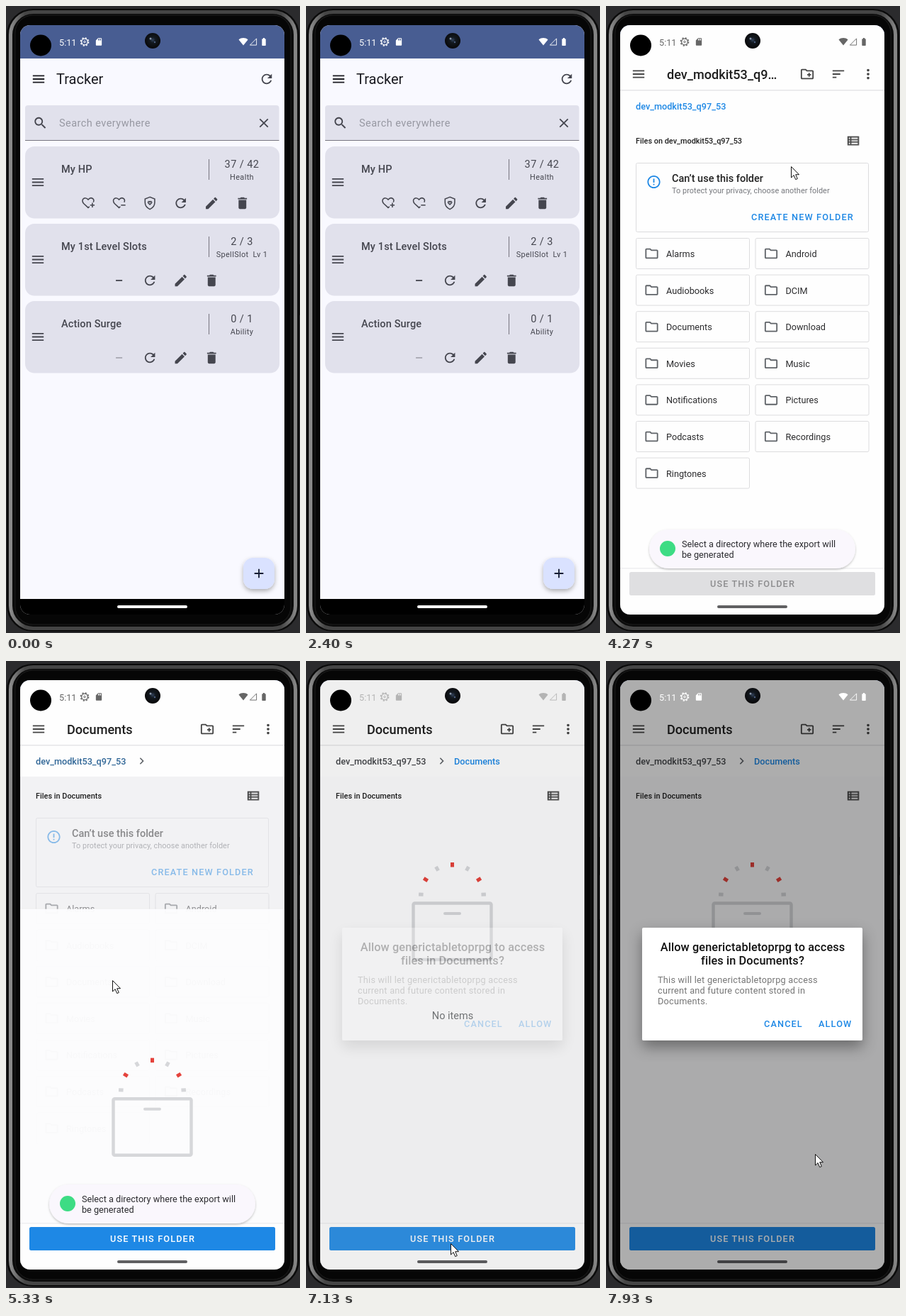
Animation of 415 by 884 pixels, one loop 8 s. Source, as an HTML page:

```html
<!DOCTYPE html>
<html lang="en">
<head>
<meta charset="utf-8">
<title>Tracker export</title>
<style>
  html, body { margin: 0; width: 100%; height: 100%; overflow: hidden; background: #2b2b2d; }
  svg { display: block; width: 415px; height: 884px; font-family: Roboto, sans-serif; }
  text { white-space: pre; }
</style>
</head>
<body>
<svg id="stage" viewBox="0 0 415 884"></svg>
<script>
const LOOP = 8000;
const DEVICE = 'dev_modkit53_q97_53';
const BLUE = '#1e88e5';
const INK = '#45464f';

const ICONS = {
  menu: 'M3 18h18v-2H3v2zm0-5h18v-2H3v2zm0-7v2h18V6H3z',
  refresh: 'M17.65 6.35C16.2 4.9 14.21 4 12 4c-4.42 0-7.99 3.58-7.99 8s3.57 8 7.99 8c3.73 0 6.84-2.55 7.73-6h-2.08c-.82 2.33-3.04 4-5.65 4-3.31 0-6-2.69-6-6s2.69-6 6-6c1.66 0 3.14.69 4.22 1.78L13 11h7V4l-2.35 2.35z',
  search: 'M15.5 14h-.79l-.28-.27C15.41 12.59 16 11.11 16 9.5 16 5.91 13.09 3 9.5 3S3 5.91 3 9.5 5.91 16 9.5 16c1.61 0 3.09-.59 4.23-1.57l.27.28v.79l5 4.99L20.49 19l-4.99-5zm-6 0C7.01 14 5 11.99 5 9.5S7.01 5 9.5 5 14 7.01 14 9.5 11.99 14 9.5 14z',
  close: 'M19 6.41L17.59 5 12 10.59 6.41 5 5 6.41 10.59 12 5 17.59 6.41 19 12 13.41 17.59 19 19 17.59 13.41 12z',
  edit: 'M3 17.25V21h3.75L17.81 9.94l-3.75-3.75L3 17.25zM20.71 7.04c.39-.39.39-1.02 0-1.41l-2.34-2.34c-.39-.39-1.02-.39-1.41 0l-1.83 1.83 3.75 3.75 1.83-1.83z',
  trash: 'M6 19c0 1.1.9 2 2 2h8c1.1 0 2-.9 2-2V7H6v12zM19 4h-3.5l-1-1h-5l-1 1H5v2h14V4z',
  minus: 'M7 11h10v2H7z',
  add: 'M19 13h-6v6h-2v-6H5v-2h6V5h2v6h6v2z',
  send: 'M17 17h2v4c0 1.1-.9 2-2 2H7c-1.1 0-2-.9-2-2V3c0-1.1.9-2 2-2h10c1.1 0 2 .9 2 2v4h-2V6H7v12h10v-1zm5-5l-4-4v3h-5v2h5v3l4-4z',
  folder: 'M9.17 6l2 2H20v10H4V6h5.17M10 4H4c-1.1 0-1.99.9-1.99 2L2 18c0 1.1.9 2 2 2h16c1.1 0 2-.9 2-2V8c0-1.1-.9-2-2-2h-8l-2-2z',
  newFolder: 'M20 6h-8l-2-2H4c-1.11 0-1.99.89-1.99 2L2 18c0 1.11.89 2 2 2h16c1.11 0 2-.89 2-2V8c0-1.11-.89-2-2-2zm0 12H4V6h5.17l2 2H20v10zm-8-4h2v2h2v-2h2v-2h-2v-2h-2v2h-2z',
  sort: 'M3 18h6v-2H3v2zM3 6v2h18V6H3zm0 7h12v-2H3v2z',
  more: 'M12 8c1.1 0 2-.9 2-2s-.9-2-2-2-2 .9-2 2 .9 2 2 2zm0 2c-1.1 0-2 .9-2 2s.9 2 2 2 2-.9 2-2-.9-2-2-2zm0 6c-1.1 0-2 .9-2 2s.9 2 2 2 2-.9 2-2-.9-2-2-2z',
  list: 'M3 5v14h18V5H3zm4 2v2H5V7h2zm-2 6v-2h2v2H5zm0 2h2v2H5v-2zm14 2H9v-2h10v2zm0-4H9v-2h10v2zm0-4H9V7h10v2z',
  alert: 'M11 15h2v2h-2zm0-8h2v6h-2zm.99-5C6.47 2 2 6.48 2 12s4.47 10 9.99 10C17.52 22 22 17.52 22 12S17.52 2 11.99 2zM12 20c-4.42 0-8-3.58-8-8s3.58-8 8-8 8 3.58 8 8-3.58 8-8 8z',
  chevron: 'M10 6L8.59 7.41 13.17 12l-4.58 4.59L10 18l6-6z',
  wifi: 'M12 21L0 6.4C3.4 3.6 7.5 2 12 2s8.6 1.6 12 4.4z',
  battery: 'M15.67 4H14V2h-4v2H8.33C7.6 4 7 4.6 7 5.33v15.33C7 21.4 7.6 22 8.33 22h7.33c.74 0 1.34-.6 1.34-1.33V5.33C17 4.6 16.4 4 15.67 4z',
  card: 'M18 2h-8L4.02 8 4 20c0 1.1.9 2 2 2h12c1.1 0 2-.9 2-2V4c0-1.1-.9-2-2-2zm-6 6h-2V4h2v4zm3 0h-2V4h2v4zm3 0h-2V4h2v4z'
};
const HEART = 'M14 17.2L12 19 5 12.5C-.5 6 7.5 1 12 6.5 16.5 1 22.5 5.5 20 10.5';
const LINES = {
  heal: HEART + 'M15 15h7M18.5 11.5v7',
  hurt: HEART + 'M15 15h7',
  shield: 'M12 2.5L4.5 5.5v5.5c0 5 3.2 8.6 7.5 10.5 4.3-1.9 7.5-5.5 7.5-10.5V5.5zM12 14.2l-2.6-2.6c-1-2.2 1.6-3.2 2.6-1.4 1-1.8 3.6-.8 2.6 1.4z',
  signal: 'M3.5 20.5h17v-17z'
};

const rect = (x, y, w, h, fill, extra = '') =>
  `<rect x="${x}" y="${y}" width="${w}" height="${h}" fill="${fill}" ${extra}/>`;
const group = (id, body, extra = '') => `<g id="${id}" ${extra}>${body}</g>`;
const icon = (name, cx, cy, color = INK, size = 21.8) => {
  const paint = LINES[name]
    ? `d="${LINES[name]}" fill="none" stroke="${color}" stroke-width="1.7"`
    : `d="${ICONS[name]}" fill="${color}"`;
  return `<path ${paint} transform="translate(${cx - size / 2} ${cy - size / 2}) scale(${size / 24})"/>`;
};
const text = (x, y, str, size, color, { w = 400, ls = 0, mid = false, id = '' } = {}) =>
  `<text ${id && `id="${id}"`} x="${x}" y="${y}" font-size="${size}" font-weight="${w}" fill="${color}" ` +
  `letter-spacing="${ls}" ${mid ? 'text-anchor="middle"' : ''}>${str}</text>`;
const caps = (x, y, str, color, id) => text(x, y, str, 12.7, color, { w: 500, ls: 1.13, id });
const pill = color => rect(157, 845, 99, 4, color, 'rx="2"');

function device() {
  return rect(0, 0, 415, 884, '#2b2b2d') +
    rect(411, 248, 4, 54, '#151515', 'rx="1"') + rect(411, 364, 4, 72, '#151515', 'rx="1"') +
    rect(2, 5, 411, 876, '#191919', 'rx="36" stroke="#0a0a0a" stroke-width="2"') +
    rect(6.5, 8.5, 402, 869, '#0b0b0b', 'rx="32" stroke="url(#metal)" stroke-width="5"') +
    rect(13, 13, 389, 859, '#060606', 'rx="25" stroke="#1d1d1d"');
}

function card(y, title, value, kind, tools, fade) {
  const first = tools.length > 4 ? 116 : 159.6;
  return rect(27, y, 359, 101.5, '#e1e1ec', 'rx="13"') +
    icon('menu', 45, y + 50.5) +
    text(78, y + 37, title, 14.5, INK, { w: 500, ls: .14 }) +
    rect(286, y + 18, 1, 29, '#777680') +
    text(333, y + 30, value, 14.5, INK, { ls: .45, mid: true }) +
    text(333, y + 47, kind, 10.9, INK, { ls: .36, mid: true }) +
    tools.map((name, i) => icon(name, first + i * 43.55, y + 80, fade && !i ? '#a9a9b3' : INK)).join('');
}

function tracker(id, hint, action, body) {
  return group(id,
    rect(20, 27, 373, 831, '#f9f9ff') + rect(20, 27, 373, 47, '#485d92') +
    icon('menu', 46, 103, '#1b1b21') + text(71, 110, 'Tracker', 20, '#1b1b21') + icon(action, 368, 103) +
    '<path d="M27 190v-46q0-4 4-4h350.500q4 0 4 4v46z" fill="#e1e1ec"/>' + rect(27, 189, 358.5, 1, '#777680') +
    icon('search', 48.5, 165) + text(75, 170, hint, 14.5, '#9798a2', { ls: .45 }) + icon('close', 364, 165) +
    body +
    rect(335, 778, 44, 44, '#dae2ff', 'rx="14" filter="url(#lift)"') + icon('add', 357, 800, '#131b33') +
    rect(20, 836, 373, 22, '#000') + pill('#fff'));
}

function folders() {
  const names = ['Alarms', 'Android', 'Audiobooks', 'DCIM', 'Documents', 'Download', 'Movies', 'Music',
    'Notifications', 'Pictures', 'Podcasts', 'Recordings', 'Ringtones'];
  const edge = 'stroke="#dcdcde" rx="2"';
  return rect(42.5, 221.5, 328, 97, 'none', edge) + icon('alert', 67.5, 248, BLUE) +
    text(93, 248, 'Can’t use this folder', 14.5, '#222', { w: 500 }) +
    text(93, 263.5, 'To protect your privacy, choose another folder', 10.9, '#75777c', { ls: .04 }) +
    caps(205, 302, 'CREATE NEW FOLDER', BLUE) +
    names.map((name, i) => {
      const x = i % 2 * 168.5, y = (i >> 1) * 51.6;
      return rect(42.5 + x, 327.5 + y, 160, 43, 'none', edge) +
        icon('folder', 64.5 + x, 349 + y, '#5f6368') + text(85 + x, 354 + y, name, 12.7, '#2b2b2d');
    }).join('');
}

function emptyBox() {
  const sparks = [-87, -58, -29, 0, 29, 58, 87].map((a, i) =>
    rect(-2.5, -47.5, 5, 6.5, [1, 3, 5].includes(i) ? '#e5433c' : '#d6d7da',
      `transform="translate(206.500 331.500) rotate(${a})"`)).join('');
  return sparks +
    rect(151.5, 341.5, 110, 79.5, 'none', 'rx="2" stroke="#d6d7da" stroke-width="4.5"') +
    rect(194, 354, 25, 4, '#d6d7da', 'rx="2"') +
    text(207, 505, 'No items', 14.5, '#3c4043', { mid: true });
}

function picker() {
  const grey = '#444';
  return group('picker',
    rect(20, 27, 373, 831, '#fefefe') +
    `<g clip-path="url(#body)">` +
      group('old', folders() + group('press', rect(43, 431, 159, 42, '#000'))) +
      group('shade', rect(20, 163, 373, 630, '#101030')) +
      group('panel', rect(20, 74, 373, 720, '#fdfdfe', 'fill-opacity=".96" filter="url(#soft)"') + emptyBox()) +
    '</g>' +
    rect(20, 118, 373, 1.5, '#e6e6e8') +
    icon('menu', 46, 96, grey) + icon('newFolder', 284, 96, grey) + icon('sort', 328, 96, grey) + icon('more', 370, 96, grey) +
    group('atRoot',
      text(86, 103, DEVICE.slice(0, 15) + '…', 18.1, '#1f1f1f', { w: 500 }) +
      text(42, 194, 'Files on ' + DEVICE, 10.9, '#1f1f1f', { w: 500 })) +
    group('atDocs',
      text(86, 103, 'Documents', 18.1, '#1f1f1f', { w: 500 }) +
      text(42, 194, 'Files in Documents', 10.9, '#1f1f1f', { w: 500 }) + icon('chevron', 191.5, 141, '#5f6368', 19)) +
    text(42, 145.5, DEVICE, 12.7, BLUE, { w: 500, id: 'crumb' }) +
    group('crumb2', text(209, 145.5, 'Documents', 12.7, BLUE, { w: 500 })) +
    icon('list', 349, 190, grey) +
    rect(20, 793, 373, 65, '#fefefe') + rect(20, 792, 373, 1.5, '#efeff1') +
    rect(33, 798, 347, 33, '#dfdfe1', 'rx="2.5" id="button"') +
    caps(147, 819, 'USE THIS FOLDER', '#8c8c8e', 'label') +
    group('ripple', rect(33, 798, 347, 33, '#fff', 'rx="2.5"')) +
    pill('#606062'));
}

const toast = () => group('toast',
  '<g transform="translate(-206.500 -765.500)">' +
  rect(61, 738, 291, 55, '#faf7fd', 'rx="27.500" filter="url(#soft)"') +
  '<circle cx="87" cy="765" r="11" fill="#3ddc84"/>' +
  text(107, 763, 'Select a directory where the export will', 12.7, '#2b2b2f') +
  text(107, 778, 'be generated', 12.7, '#2b2b2f') + '</g>');

function dialog() {
  const head = { w: 500, ls: .11, mid: true }, body = { ls: .25 };
  return group('dim', rect(20, 27, 373, 831, '#000')) + group('dialog',
    rect(51, 376, 311, 159, '#fff', 'rx="2" filter="url(#deep)"') +
    text(207, 409, 'Allow generictabletoprpg to access', 16.3, '#111', head) +
    text(207, 428, 'files in Documents?', 16.3, '#111', head) +
    text(73, 454, 'This will let generictabletoprpg access', 12.7, '#757575', body) +
    text(73, 469, 'current and future content stored in', 12.7, '#757575', body) +
    text(73, 484, 'Documents.', 12.7, '#757575', body) +
    caps(223, 516, 'CANCEL', BLUE) + caps(300, 516, 'ALLOW', BLUE));
}

function status() {
  const c = 'currentColor';
  return group('status', text(75, 55.5, '5:11', 12.7, c) +
    `<g fill="none" stroke="${c}" transform="translate(111 50.500)"><circle r="4.300" stroke-width="1.300"/>` +
    '<circle r="5.600" stroke-width="1.500" stroke-dasharray="2.200"/><circle r="1.300"/></g>' +
    icon('card', 131, 50.5, c, 12.5) + icon('wifi', 335, 50.5, c, 13) +
    icon('signal', 349, 50.5, c, 13) + icon('battery', 364, 50.5, c, 13));
}

const shadow = (id, dy, blur, a) =>
  `<filter id="${id}" x="-30%" y="-40%" width="160%" height="190%"><feDropShadow dx="0" dy="${dy}" stdDeviation="${blur}" flood-opacity="${a}"/></filter>`;

document.getElementById('stage').innerHTML =
  '<defs><linearGradient id="metal"><stop stop-color="#8b8b8b"/><stop offset=".05" stop-color="#454545"/>' +
  '<stop offset=".95" stop-color="#454545"/><stop offset="1" stop-color="#858585"/></linearGradient>' +
  '<radialGradient id="lens" cx=".5" cy=".45"><stop stop-color="#33435c"/><stop offset=".35" stop-color="#131920"/><stop offset="1" stop-color="#0a0a0c"/></radialGradient>' +
  '<clipPath id="screen"><rect x="20" y="27" width="373" height="831" rx="14"/></clipPath>' +
  '<clipPath id="body"><rect x="20" y="163" width="373" height="630"/></clipPath>' +
  shadow('lift', 3, 3, .3) + shadow('soft', 1.5, 1.5, .25) + shadow('deep', 9, 10, .38) + '</defs>' +
  device() +
  '<g clip-path="url(#screen)">' +
    tracker('cards', 'Search everywhere', 'refresh',
      card(198, 'My HP', '37 / 42', 'Health', ['heal', 'hurt', 'shield', 'refresh', 'edit', 'trash']) +
      card(307, 'My 1st Level Slots', '2 / 3', 'SpellSlot\u00a0\u00a0Lv 1', ['minus', 'refresh', 'edit', 'trash']) +
      card(416, 'Action Surge', '0 / 1', 'Ability', ['minus', 'refresh', 'edit', 'trash'], true)) +
    tracker('people', 'Search', 'send',
      text(42, 232, 'My Character', 14.5, '#1b1b21', { ls: .45 }) +
      group('hover', '<circle cx="263" cy="227" r="18" fill="#1b1b21"/>') +
      icon('send', 263, 227, '#1b1b21') + icon('edit', 306, 227, '#1b1b21') + icon('trash', 349.5, 227, '#1b1b21')) +
    picker() + toast() + dialog() + status() +
  '</g>' +
  '<circle cx="49" cy="55.500" r="15" fill="#000"/><circle cx="207" cy="49" r="11" fill="url(#lens)"/>' +
  '<circle cx="204" cy="46" r="1.500" fill="#8794a8"/><circle cx="210" cy="51" r="1.200" fill="#4c5f80"/>' +
  group('cursor', '<path d="M.5 .5v15.500l3.600-3.400 2.600 6 2.600-1.100-2.600-5.800h4.800z" fill="#fff" stroke="#111"/>');

// Each step is [ms, value, easing to the next step]; equal times make a hard change.
function play(id, prop, steps) {
  const all = [[0, steps[0][1]], ...steps, [LOOP, steps[steps.length - 1][1]]];
  document.getElementById(id).animate(
    all.map(([ms, value, easing = 'linear']) => ({ offset: ms / LOOP, [prop]: value, easing })),
    { duration: LOOP, iterations: Infinity });
}
const fade = (id, ...steps) => play(id, 'opacity', steps);
const cut = (id, ms, from, to, prop = 'opacity') => play(id, prop, [[ms, from], [ms, to]]);
const at = (x, y) => `translate(${x}px, ${y}px)`;
const SOFT = 'cubic-bezier(.4, 0, .4, 1)';
const SLOW = 'cubic-bezier(.33, .67, .67, 1)';

cut('people', 2530, 0, 1);
fade('hover', [3470, 0], [3530, .05]);

fade('picker', [3960, 0], [4130, 1]);
play('picker', 'transform', [[3960, at(37, 0), 'ease-out'], [4260, at(0, 0)]]);
play('status', 'color', [[3960, '#fff'], [4130, '#666'], [7070, '#666'], [7190, '#fff']]);

fade('toast', [3850, 0], [4050, 1], [6070, 1], [6400, 0]);
play('toast', 'transform', [[3850, at(206.5, 765.5) + ' scale(.967)'], [4050, at(206.5, 765.5) + ' scale(1)']]);

fade('press', [5200, 0], [5200, .08], [5400, 0]);
fade('old', [5230, 1], [5430, 0]);
fade('shade', [5230, 0], [5290, .055], [5530, 0]);
play('panel', 'transform', [[5230, at(0, 720)], [5230, at(0, 630), SLOW], [5530, at(0, 0)]]);
cut('atRoot', 5230, 1, 0);
cut('atDocs', 5230, 0, 1);
play('crumb', 'fill', [[5230, BLUE], [5430, '#44464a']]);
fade('crumb2', [5350, 0], [5500, 1]);
cut('button', 5230, '#dfdfe1', BLUE, 'fill');
cut('label', 5230, '#8c8c8e', '#fff', 'fill');

fade('ripple', [7070, 0], [7130, .08], [7400, 0]);
fade('dim', [7070, 0], [7400, .32]);
fade('dialog', [7070, 0], [7290, 1]);

fade('cursor', [130, 0], [130, 1], [1600, 1], [1600, 0], [2870, 0], [2870, 1]);
play('cursor', 'transform', [
  [130, at(412, 880), SOFT], [930, at(208, 396)], [1000, at(208, 396), SOFT], [1600, at(108, 4)],
  [2870, at(108, 4)], [2870, at(116, 24), SOFT], [3530, at(261, 226)],
  [4330, at(261, 226), SOFT], [4930, at(150, 450)],
  [5600, at(150, 450), SOFT], [6600, at(204, 821)],
  [7300, at(204, 821), SOFT], [7870, at(182, 800)], [7930, at(182, 800)], [7930, at(295, 695)]
]);
</script>
</body>
</html>
```
